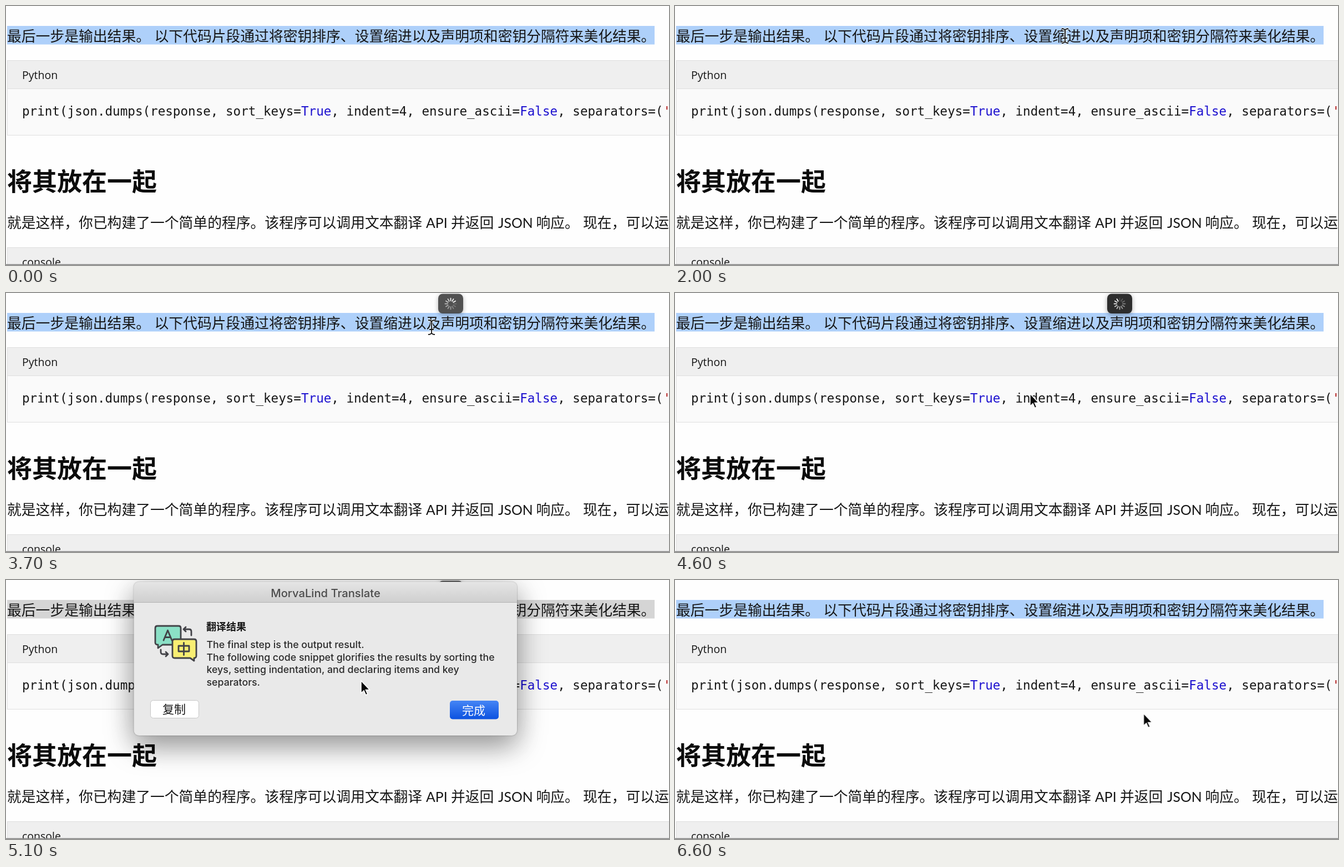
Animation, 1195 px wide and 468 px high, one loop 6.8 s. Source, as an HTML page:

```html
<!DOCTYPE html>
<html lang="zh-CN">
<head>
<meta charset="utf-8">
<title>翻译演示</title>
<style>
  :root { --loop: 6.8s; }
  html, body { margin: 0; width: 100%; height: 100%; overflow: hidden; background: #fefefe; }
  svg { display: block; width: 100vw; height: 100vh; }

  text { fill: #161616; font-family: "Noto Sans CJK SC", "Noto Sans CJK", sans-serif; }
  .body { font-size: 25.8px; }
  .latin { font: 24.8px Lato, sans-serif; }
  .label { font: 19.5px "Open Sans", "Noto Sans", sans-serif; }
  .heading { font-size: 45px; font-weight: 700; fill: #0c0c0c; }
  .code { font: 22.58px "DejaVu Sans Mono", monospace; }
  .keyword { fill: #1c10cf; }
  .string { fill: #b01818; }
  .menu-item { font-size: 17.7px; fill: #f0f0f0; }
  .title { font: 500 20.2px Inter, sans-serif; fill: #4c4c4c; text-anchor: middle; }
  .result { font: 500 17.75px Inter, sans-serif; fill: #2a2a2a; }
  .button { font-size: 21px; text-anchor: middle; }

  .block { fill: #fafafa; stroke: #dedede; }
  .block-head { fill: #efefef; stroke: #dedede; }
  .panel { fill: #2d2d2d; filter: drop-shadow(0 2px 4px rgba(0, 0, 0, .35)); }
  .outline { fill: none; stroke: #424247; stroke-width: 2.8; stroke-linejoin: round; stroke-linecap: round; }
  .window { fill: #e9e9e9; filter: drop-shadow(0 18px 26px rgba(0, 0, 0, .34)) drop-shadow(0 0 1px rgba(0, 0, 0, .4)); }

  #selection, #menu, #busy, #dialog, #cursor, #arrow, #beam {
    animation: var(--loop) step-end infinite;
  }
  #selection { animation-name: selection; }
  #menu { animation-name: menu; }
  #busy { animation-name: busy; }
  #dialog { animation-name: dialog; transform-origin: 575.5px 142px; }
  #cursor { animation-name: cursor; }
  #arrow { animation-name: arrow; }
  #beam { animation-name: beam; filter: drop-shadow(0 0 1px #fff) drop-shadow(0 0 1px #fff); }
  #spinner { transform-origin: 801.5px 19.5px; animation: spin calc(var(--loop) / 6) steps(12) infinite; }

  @keyframes selection {
    0% { fill: #aed0fa; }
    1.46% { fill: transparent; }
    27.9% { fill: #aed0fa; }
    70.5% { fill: #d5d5d5; }
    91.1%, 100% { fill: #aed0fa; }
  }
  @keyframes menu {
    0% { opacity: 0; }
    32.3% { opacity: .6; }
    33.8% { opacity: 1; }
    50%, 100% { opacity: 0; }
  }
  @keyframes busy {
    0% { opacity: 0; }
    49.9% { opacity: .83; }
    57.3% { opacity: 1; }
    91.1%, 100% { opacity: 0; }
  }
  @keyframes dialog {
    0% { opacity: 0; transform: scale(.6); }
    70.5% { opacity: .12; transform: scale(.64); }
    72% { opacity: .52; transform: scale(.731); }
    73.5% { opacity: .85; transform: scale(.92); }
    74.9% { opacity: 1; transform: none; }
    91.1% { opacity: .6; transform: none; }
    92.6% { opacity: .2; transform: none; }
    94.1%, 100% { opacity: 0; transform: none; }
  }
  @keyframes cursor {
    0% { opacity: 0; transform: translate(663px, 333px); }
    1.46% { opacity: 1; transform: translate(663px, 333px); }
    8.82% { opacity: 1; transform: translate(663px, 333px); animation-timing-function: steps(3); }
    13.23% { opacity: 1; transform: translate(677px, 238px); animation-timing-function: steps(3); }
    17.64% { opacity: 1; transform: translate(673.5px, 98.5px); animation-timing-function: steps(3); }
    22.05% { opacity: 1; transform: translate(700px, 56px); }
    23.52% { opacity: 1; transform: translate(703px, 54px); }
    38.23% { opacity: 1; transform: translate(703px, 54px); animation-timing-function: steps(5); }
    45.58% { opacity: 1; transform: translate(800px, 20px); }
    50% { opacity: 1; transform: translate(800px, 20px); animation-timing-function: steps(3); }
    54.41% { opacity: 1; transform: translate(767px, 62px); }
    57.35% { opacity: 1; transform: translate(767px, 62px); animation-timing-function: steps(6); }
    66.17% { opacity: 1; transform: translate(640px, 182px); }
    77.94% { opacity: 1; transform: translate(640px, 182px); animation-timing-function: steps(5); }
    85.29%, 100% { opacity: 1; transform: translate(844.5px, 241px); }
  }
  @keyframes arrow {
    0% { opacity: 1; }
    20.5% { opacity: 0; }
    44.1% { opacity: 1; }
    51.4% { opacity: 0; }
    58.8%, 100% { opacity: 1; }
  }
  @keyframes beam {
    0% { opacity: 0; }
    20.5% { opacity: 1; }
    44.1% { opacity: 0; }
    51.4% { opacity: 1; }
    58.8%, 100% { opacity: 0; }
  }
  @keyframes spin { to { transform: rotate(360deg); } }
</style>
</head>
<body>
<svg viewBox="0 0 1195 468" preserveAspectRatio="none">
  <defs>
    <linearGradient id="bar" x2="0" y2="1">
      <stop stop-color="#e5e5e5"/><stop offset="1" stop-color="#cfcfcf"/>
    </linearGradient>
    <linearGradient id="blue" x2="0" y2="1">
      <stop stop-color="#4585f5"/><stop offset="1" stop-color="#0c52e0"/>
    </linearGradient>
  </defs>

  <!-- Page -->
  <rect width="1195" height="468" fill="#fefefe"/>
  <rect id="selection" x="2" y="36" width="1167" height="33.5"/>
  <text class="body" y="64"><tspan x="2">最后一步是输出结果。</tspan><tspan x="267.5">以下代码片段通过将密钥排序、设置缩进以及声明项和密钥分隔符来美化结果。</tspan></text>

  <rect class="block" x="2.5" y="98.5" width="1200" height="135"/>
  <rect class="block-head" x="2.5" y="98.5" width="1200" height="51"/>
  <text class="label" x="29" y="132">Python</text>
  <text class="code" x="29" y="198">print(json.dumps(response, sort_keys=<tspan class="keyword">True</tspan>, indent=4, ensure_ascii=<tspan class="keyword">False</tspan>, separators=(<tspan class="string">'</tspan></text>

  <text class="heading" x="2" y="334">将其放在一起</text>
  <text class="body" y="401"><tspan x="2">就是这样，你已构建了一个简单的程序。该程序可以调用文本翻译</tspan><tspan class="latin" x="757">API</tspan><tspan x="802">并返回</tspan><tspan class="latin" x="887">JSON</tspan><tspan x="955.5">响应。</tspan><tspan x="1040">现在，可以运</tspan></text>

  <rect class="block-head" x="2.5" y="436.5" width="1200" height="51"/>
  <text class="label" x="29" y="469.5">console</text>
  <rect y="466.5" width="1195" height="1.5" fill="#858585"/>

  <!-- Selection menu -->
  <g id="menu">
    <rect class="panel" x="598" y="1.5" width="226" height="35.5" rx="8"/>
    <g fill="none" stroke="#f4f4f4">
      <circle cx="618.5" cy="16.5" r="6" stroke-width="2.8"/>
      <path d="M623 21l6 6" stroke-width="3.6" stroke-linecap="round"/>
      <g stroke-width="1.5">
        <rect x="792" y="10" width="12" height="12" rx="2"/>
        <path d="M795 14h6M798 12v2M795.5 19l5-5M796 15l4 4"/>
        <path d="M806 15h3q2 0 2 2v9q0 2-2 2h-8q-2 0-2-2v-2M802 25.5l3-8 3 8M803 23h4"/>
      </g>
    </g>
    <text class="menu-item" x="659" y="26">拷贝</text>
    <text class="menu-item" x="727" y="26">粘贴</text>
  </g>
  <g id="busy">
    <rect class="panel" x="779" y="1.5" width="45" height="35.5" rx="8"/>
    <g id="spinner" stroke="#fff" stroke-width="1.8" stroke-linecap="round"></g>
  </g>

  <!-- Result window -->
  <g id="dialog">
    <rect class="window" x="230.5" y="3.5" width="690.5" height="277.5" rx="9"/>
    <path d="M230.5 40V12.5a9 9 0 0 1 9-9H912a9 9 0 0 1 9 9V40Z" fill="url(#bar)"/>
    <path d="M230.5 40.5H921" stroke="#b4b4b4"/>
    <text class="title" x="576" y="30.5">MorvaLind Translate</text>

    <g class="outline">
      <path d="M273 83h38q4 0 4 4v26q0 4-4 4h-29l-8 6v-6q-5 0-5-4V87q0-4 4-4Z" fill="#8be0c6"/>
      <path d="M284 109l7.5-18 7.5 18M286.5 103.5h10"/>
      <path d="M304 107h35q4 0 4 4v26q0 4-4 4v5l-7-5h-28q-4 0-4-4v-26q0-4 4-4Z" fill="#f8ee72"/>
      <path d="M311 119h19v10h-19ZM320.5 113.5v22"/>
      <path d="M320 89h10q4 0 4 4v7M324 85l-4 4 4 4M292 134h-9q-4 0-4-4v-4M288 130l4 4-4 4"/>
    </g>

    <text x="361" y="91" font-size="18" font-weight="700">翻译结果</text>
    <text class="result">
      <tspan x="361.5" y="123">The final step is the output result.</tspan>
      <tspan x="361.5" y="145.5">The following code snippet glorifies the results by sorting the</tspan>
      <tspan x="361.5" y="168">keys, setting indentation, and declaring items and key</tspan>
      <tspan x="361.5" y="190.5">separators.</tspan>
    </text>

    <rect x="260.5" y="217.5" width="87" height="32" rx="5" fill="#fff" stroke="#c6c6c6"/>
    <text class="button" x="303" y="241">复制</text>
    <rect x="800" y="218" width="88" height="33.5" rx="5" fill="url(#blue)"/>
    <text class="button" x="843" y="242.5" style="fill:#fff">完成</text>
  </g>

  <!-- Pointer -->
  <g id="cursor">
    <path id="arrow" d="M0 0V22.5L5 17.8 8.5 25.8 11.8 24.3 8.3 16.5H15.5Z" fill="#080808" stroke="#fff" stroke-width="1.5"/>
    <path id="beam" d="M-6-13q5 0 6 3q1-3 6-3M0-10V10M-6 13q5 0 6-3q1 3 6 3M-4 4H4" fill="none" stroke="#151515" stroke-width="1.8"/>
  </g>
</svg>
<script>
  const spinner = document.getElementById('spinner');
  for (let i = 0; i < 12; i++) {
    const spoke = document.createElementNS(spinner.namespaceURI, 'path');
    spoke.setAttribute('d', 'M801.5 14v-4.5');
    spoke.setAttribute('transform', `rotate(${i * 30} 801.5 19.5)`);
    spoke.setAttribute('opacity', 0.15 + 0.85 * i / 11);
    spinner.append(spoke);
  }
</script>
</body>
</html>
```
